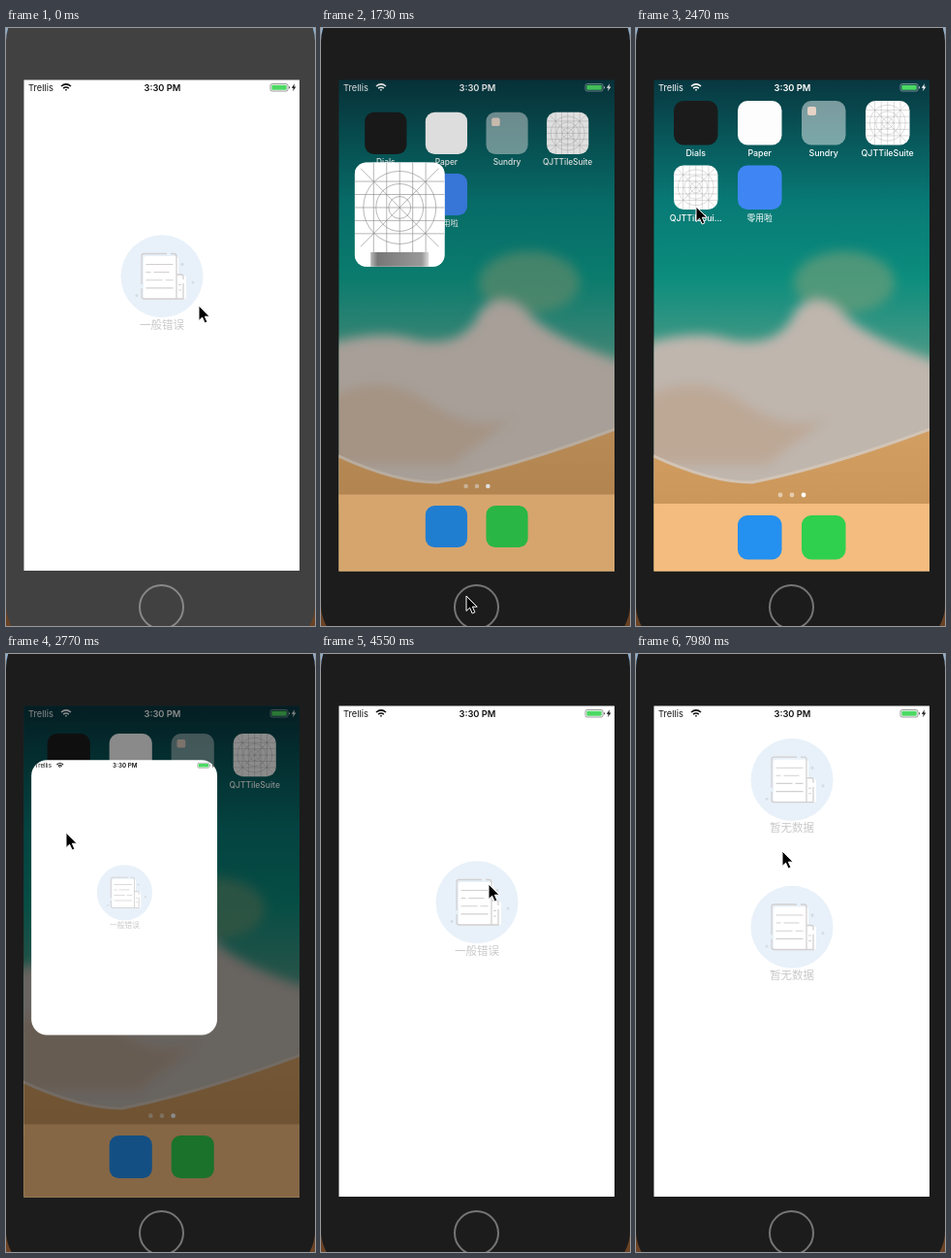
These frames come from a looping animation (319x616 px, 8 s). An HTML page:

```html
<!DOCTYPE html>
<html lang="zh">
<head>
<meta charset="utf-8">
<title>View states</title>
<style>
html, body { margin: 0; width: 100%; height: 100%; overflow: hidden; background: #1c1c1c; }
svg { display: block; width: 100%; height: 100%; }
text { font-family: Inter, "Noto Sans CJK SC", "Noto Sans CJK", sans-serif; }
.status text { font-size: 9.3px; fill: currentColor; }
.label { font-size: 8.8px; font-weight: 500; fill: #fff; text-anchor: middle; }
.caption { font-size: 11.5px; font-weight: 500; fill: #c9c9c9; text-anchor: middle; }
.grid { fill: none; stroke: #888; stroke-width: .3; }
</style>
</head>
<body>
<svg viewBox="0 0 319 616" preserveAspectRatio="none">
  <defs>
    <linearGradient id="desk" x2="0" y2="1">
      <stop stop-color="#8fb2d4"/><stop offset=".5" stop-color="#555"/><stop offset="1" stop-color="#6b4223"/>
    </linearGradient>
    <linearGradient id="sea" x2="0" y2="1">
      <stop stop-color="#083740"/><stop offset=".25" stop-color="#087a76"/>
      <stop offset=".4" stop-color="#0b8d7d"/><stop offset=".62" stop-color="#5f9d88"/>
    </linearGradient>
    <linearGradient id="sand" x2="0" y2="1">
      <stop stop-color="#d3a064"/><stop offset="1" stop-color="#c38d50"/>
    </linearGradient>
    <linearGradient id="shade">
      <stop stop-color="#bbb"/><stop offset=".12" stop-color="#777"/><stop offset=".88" stop-color="#999"/><stop offset="1" stop-color="#ddd"/>
    </linearGradient>
    <filter id="soft"><feGaussianBlur stdDeviation="6"/></filter>
    <clipPath id="screenClip"><rect x="18.5" y="53.5" width="284.5" height="506"/></clipPath>
    <clipPath id="windowClip"><rect id="windowShape"/></clipPath>

    <g id="status" class="status">
      <text x="23" y="64.7">Trellis</text>
      <text x="161.5" y="64.7" text-anchor="middle" font-weight="600">3:30 PM</text>
      <g fill="none" stroke="currentColor" stroke-width="1.6">
        <path d="M57 60q5-4.4 10 0M59.1 62.2q2.9-2.4 5.8 0"/>
        <rect x="273" y="57.5" width="18" height="7.5" rx="1.8" stroke-width=".7" opacity=".6"/>
      </g>
      <path d="M60.8 63.5q1.2-1 2.4 0l-1.2 1.5zM292 59.8q1.5 1.5 0 3zM298 57.3l-3.2 4.5h2l-.8 3.5 3.300-4.700h-2z" fill="currentColor"/>
      <rect x="274.3" y="58.7" width="15.4" height="5.1" rx=".8" fill="#4cd964"/>
    </g>

    <g id="picture">
      <circle cx="161" cy="255.7" r="42.5" fill="#e8f1f9"/>
      <rect x="142" y="235" width="36" height="44" rx="3" fill="#fff"/>
      <rect x="176" y="255" width="10" height="24" rx="2" fill="#fff"/>
      <g fill="none" stroke="#d3cfd0" stroke-width="1.3">
        <path d="M140 264V235q0-2.5 2.5-2.5H166M170 232.500h3.500q2.500 0 2.500 2.500v44h-33.500q-2.500 0-2.500-2.500V268M176 254h5q2 0 2 2v3m0 4v16h-7"/>
        <path d="M144.500 243.500h28M144.500 251.500h5m3 0h16M144.500 259.700h17m3 0h8M144.500 267.900h28M178 264.500h3M178 270h3" stroke-width="1.1"/>
      </g>
      <g fill="#d5dce3"><circle cx="182" cy="243.5" r="1.7"/><circle cx="193" cy="262" r="1.5"/><circle cx="135" cy="275.5" r="1.5"/></g>
    </g>

    <g id="gridIcon"></g>
  </defs>

  <rect width="319" height="616" fill="url(#desk)"/>
  <rect id="bezel" y="-32" width="319" height="672" rx="46"/>
  <circle id="button" cx="160.5" cy="596.5" r="22.5" fill="none" stroke-width="2"/>

  <g clip-path="url(#screenClip)">
    <g id="home">
      <rect x="18" y="53" width="286" height="507" fill="url(#sea)"/>
      <g filter="url(#soft)">
        <ellipse cx="215" cy="262" rx="52" ry="32" fill="#6b9d79" opacity=".7"/>
        <path d="M0 328Q60 308 100 322Q150 330 165 290Q190 268 215 295T330 350V490H0z" fill="#bfb6ae"/>
        <path d="M0 385Q60 350 110 385T200 400L135 450H0z" fill="#bd9f88" opacity=".6"/>
      </g>
      <path d="M0 432Q70 468 120 468Q210 450 330 403V580H0z" fill="url(#sand)" stroke="#d2c4b5" stroke-width="3"/>
      <g id="springboard">
        <rect x="-20" y="490" width="360" height="150" fill="#f4bc7e"/>
        <g id="icons"></g>
      </g>
      <use href="#status" color="#fff"/>
      <rect id="dim" x="18" y="53" width="286" height="507"/>
    </g>

    <g id="window" clip-path="url(#windowClip)">
      <rect x="18" y="53" width="286" height="507" fill="#fff"/>
      <g id="content">
        <use href="#status" color="#111"/>
        <g id="first"><use href="#picture"/><text id="caption" class="caption" x="161" y="309.7"></text></g>
        <g id="second"><use href="#picture"/><text class="caption" x="161" y="309.7">暂无数据</text></g>
      </g>
      <g id="cover">
        <rect width="45.5" height="120" fill="#fff"/>
        <use href="#gridIcon"/>
        <rect x="8" y="45.3" width="29.5" height="9" fill="url(#shade)"/>
      </g>
    </g>
  </g>
  <path id="cursor" d="M0 0V15.500L3.600 12.200 6.200 18 8.900 16.800 6.400 11.200H11.200z" stroke="#fff"/>
</svg>
<script>
const $ = id => document.getElementById(id);
const set = (id, attrs) => { for (const k in attrs) $(id).setAttribute(k, attrs[k]); };
const show = (id, visible) => set(id, { display: visible ? 'inline' : 'none' });
const mix = (a, b, u) => a + (b - a) * u;
const progress = (t, start, end) => Math.min(1, Math.max(0, (t - start) / (end - start)));
const smooth = u => u * u * (3 - 2 * u);

const DURATION = 8000, STEP = 148.8, ICON = 45.5, WIDTH = 285, HEIGHT = 506;
const HOME_CLICK = 1280, RETRY = 4840, RELOAD = 6335, LIST = 7080;

// Pointer moves: start, end, target x, target y
const moves = [[0, 750, 117, 510], [750, 1160, 150, 585], [1730, 2020, 123, 226], [2020, 2470, 62, 184],
  [2920, 3800, 161, 583], [4100, 4550, 173, 237], [5740, 6040, 160, 247], [6950, 7980, 151, 203]];

function pointerAt(t) {
  let x = 199, y = 286;
  for (const [start, end, toX, toY] of moves) {
    const u = smooth(progress(t, start, end));
    x = mix(x, toX, u);
    y = mix(y, toY, u);
  }
  return [x, y];
}

function buildGridIcon() {
  const c = ICON / 2;
  const lines = [-2, -1, 0, 1, 2].map(i => `M${c + i * 6.6} 0v${ICON}M0 ${c + i * 6.6}h${ICON}`).join('');
  const rings = [5.6, 12, 18.4].map(r => `<circle cx="${c}" cy="${c}" r="${r}"/>`).join('');
  $('gridIcon').innerHTML = `<rect width="${ICON}" height="${ICON}" rx="10" fill="#fff"/>` +
    `<g class="grid">${rings}<path d="${lines}M3 3L42.5 42.5M42.5 3L3 42.5"/></g>`;
}

function appIcon(name, color, column, row) {
  const y = row < 2 ? 75 + 66.5 * row : 502;
  const face = color ? `<rect width="${ICON}" height="${ICON}" rx="10" fill="${color}"/>` : '<use href="#gridIcon"/>';
  return `<g id="app${row}${column}" transform="translate(${39 + 66 * column} ${y})">${face}` +
    `<text class="label" x="22.7" y="57.3">${name}</text></g>`;
}

function buildHome() {
  const rows = [
    [['Dials', '#1b1b1b'], ['Paper', '#fdfdfd'], ['Sundry', '#ffffff77'], ['QJTTileSuite']],
    [['QJTTileSui...'], ['零用啦', '#3f86f4']],
    [null, ['', '#2490ef'], ['', '#2fd04e']]];
  const icons = rows.flatMap((apps, row) => apps.map((app, column) => app ? appIcon(app[0], app[1], column, row) : ''));
  const dots = [0, 1, 2].map(i => `<circle cx="${149 + 12 * i}" cy="481" r="2.400" fill="#fff" opacity="${i < 2 ? .5 : 1}"/>`);
  $('icons').innerHTML = icons.join('') + dots.join('');
  $('app02').insertAdjacentHTML('beforeend', '<rect x="6" y="6" width="9" height="9" rx="2" fill="#e5d3c6"/>');
}

// p runs from 0 (full screen) to 1 (app icon)
function drawZoom(p, opening) {
  const away = 1 - p;
  const width = mix(WIDTH, ICON, p), height = mix(HEIGHT, ICON, p + .4 * p * away);
  const x = mix(18, 39, p), y = mix(306, 164.2, p) - height / 2;
  const place = scale => `translate(${x} ${y}) scale(${scale})`;
  set('windowShape', { x, y, width, height, rx: p && 20 - 10 * p });
  set('content', { transform: `${place(width / WIDTH)} translate(-18 -53)` });
  set('cover', { transform: place(width / ICON), opacity: progress(p, .45, .75) });
  set('springboard', {
    transform: `translate(160.5 306) scale(${1 - (opening ? .05 : .26) * away}) translate(-160.5 -306)`
  });
  set('dim', { opacity: .8 * away ** 1.15 });
  show('window', p < 1);
  show('app10', p === 1);
  show('home', p > 0);
}

function draw(now) {
  // The screen updates at a fixed coarse rate.
  const step = Math.floor((now % DURATION + 64) / STEP), t = step * STEP - 57;
  const active = t > HOME_CLICK, list = t > LIST;
  set('bezel', { fill: active ? '#1c1c1c' : '#414141' });
  set('button', { stroke: active ? '#757575' : '#888' });

  const closing = 1 - (1 - progress(t, 1440, 2010)) ** 2.3;
  const opening = smooth(progress(t, 2480, 2985));
  drawZoom(closing - opening, opening > 0);

  const reloading = [RETRY, RELOAD].some(start => t >= start && t < start + STEP);
  const offset = 80 * (1 - progress(t, LIST, 7970));
  $('caption').textContent = t < RELOAD ? '一般错误' : '暂无数据';
  set('first', { opacity: reloading ? .6 : 1, transform: `translate(0 ${list ? offset - 126.3 : 0})` });
  set('second', { transform: `translate(0 ${offset + 25.5})` });
  show('second', list);
  set('cursor', { transform: `translate(${pointerAt(t)})` });
  requestAnimationFrame(draw);
}

buildGridIcon();
buildHome();
requestAnimationFrame(draw);
</script>
</body>
</html>
```
